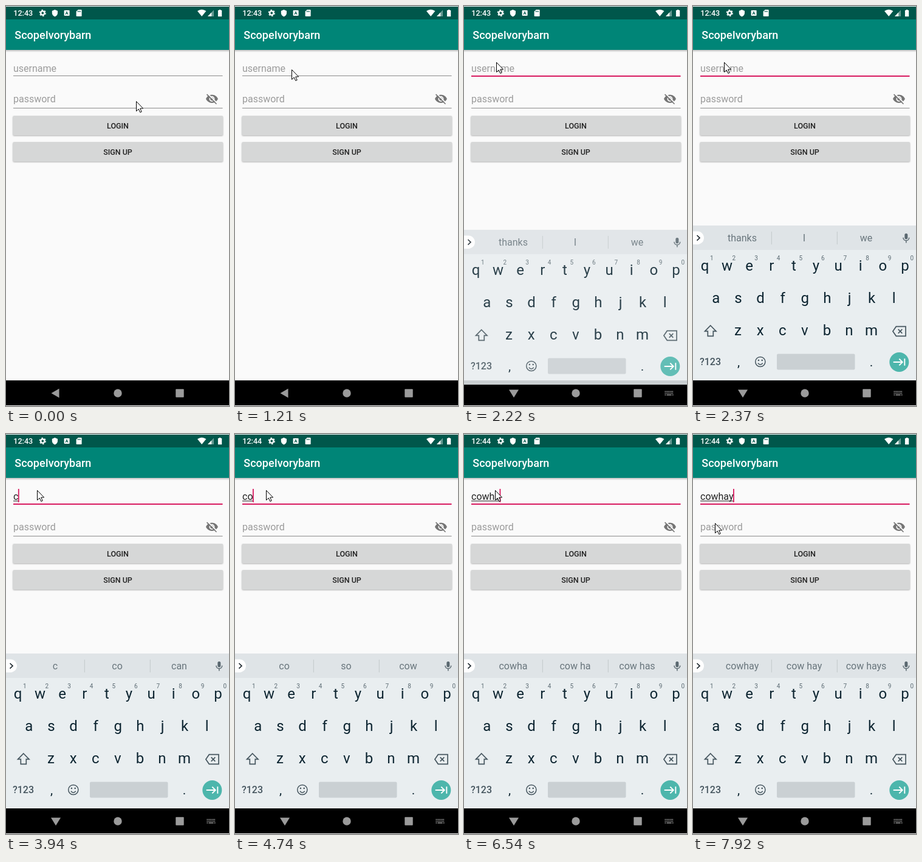
These frames come from a looping animation (367 px wide and 656 px high, 8000 ms). An HTML page:

```html
<!DOCTYPE html>
<html lang="en">
<head>
<meta charset="utf-8">
<title>Sign-in screen</title>
<style>
  html, body { margin: 0; width: 100%; height: 100%; overflow: hidden; background: #fafafa; }
  svg { display: block; font-family: Roboto, sans-serif; }
  .mid { text-anchor: middle; }
  .medium { font-weight: 500; }
  .field { font-size: 16px; fill: #212121; }
  .hint { fill: #9b9b9b; }
  .button { fill: #d6d7d7; filter: drop-shadow(0 1px 1px rgba(0, 0, 0, .3)); }
  .label { font-size: 12.5px; fill: #212121; }
  .key { font-size: 24px; fill: #0d2531; }
  .digit { font-size: 10px; fill: #5c6b73; }
  .word { font-size: 16px; fill: #68757c; }
  .line { fill: none; stroke: #46565f; stroke-width: 1.7; }
</style>
</head>
<body>
<svg width="367" height="656" viewBox="0 0 367 656">
  <defs>
    <linearGradient id="fade" x2="0" y2="1">
      <stop stop-opacity=".24"/>
      <stop offset="1" stop-opacity="0"/>
    </linearGradient>
  </defs>
  <rect width="367" height="656" fill="#fafafa"/>

  <!-- status bar and title -->
  <rect y="1" width="367" height="21" fill="#00574b"/>
  <rect y="22" width="367" height="50" fill="#008577"/>
  <rect y="72" width="367" height="4" fill="url(#fade)"/>
  <g fill="#fff">
    <text id="clock" class="medium" x="12.3" y="16.2" font-size="12.6"></text>
    <text class="medium" x="14.3" y="54" font-size="18">ScopeIvorybarn</text>
    <circle cx="60.3" cy="11.5" r="3.1" fill="none" stroke="#fff" stroke-width="2.4"/>
    <circle cx="60.3" cy="11.5" r="4.9" fill="none" stroke="#fff" stroke-width="1.5" stroke-dasharray="2.6 2.53"/>
    <path d="M80.4 6L85 8V11.5C85 14.4 83 16.6 80.4 17.4C77.8 16.6 75.8 14.4 75.8 11.5V8Z"/>
    <rect x="95.6" y="7" width="9" height="9" rx="1"/>
    <text class="mid" x="100.1" y="14.2" font-size="7.5" font-weight="700" fill="#00574b">A</text>
    <path d="M118.6 6H123.6Q124.6 6 124.6 7V16Q124.6 17 123.6 17H116.6Q115.6 17 115.6 16V9Z"/>
    <path d="M118.4 7.8V10M120.3 7.8V10M122.2 7.8V10" stroke="#00574b"/>
    <path d="M322.2 17L315 8.3Q322.2 3.2 329.4 8.3Z"/>
    <path d="M332 17H342V6.5Z" opacity=".4"/>
    <path d="M332 17H338.2V10.5Z"/>
    <path d="M350.7 6H353.4V7H355.2V17.2H348.9V7H350.7Z"/>
  </g>

  <!-- form -->
  <rect id="rule" x="12" y="114" width="344.5"/>
  <rect x="12" y="167" width="344.5" height="1" fill="#8c8c8c"/>
  <text id="userHint" class="field hint" x="12" y="107.6">username</text>
  <text id="user" class="field" x="12" y="107.6"></text>
  <rect id="under" x="12" y="109.4" height="1" fill="#212121"/>
  <rect id="caret" y="90" width="1.8" height="22" fill="#d81b60"/>
  <text class="field hint" x="12" y="158">password</text>
  <g transform="translate(328.2 141.6) scale(.893)" fill="#757575">
    <path d="M1 12C2.7 7.6 7 4.5 12 4.5S21.3 7.6 23 12C21.3 16.4 17 19.5 12 19.5S2.7 16.4 1 12Z"/>
    <circle cx="12" cy="12" r="5" fill="#fafafa"/>
    <circle cx="12" cy="12" r="3"/>
    <path d="M4 2.2L22 20.2" stroke="#fafafa" stroke-width="2"/>
    <path d="M2.6 3.6L20.4 21.4" stroke="#757575" stroke-width="1.8"/>
  </g>
  <rect class="button" x="11.5" y="180" width="345.5" height="32" rx="1.8"/>
  <rect class="button" x="11.5" y="223" width="345.5" height="32" rx="1.8"/>
  <text class="label medium mid" x="184" y="201">LOGIN</text>
  <text class="label medium mid" x="184" y="244">SIGN UP</text>

  <!-- navigation bar -->
  <rect y="614" width="367" height="41" fill="#000"/>
  <g fill="#9b9b9b">
    <path id="back" d="M74.5 635L87.5 627.5V642.5Z"/>
    <circle cx="184" cy="635" r="6.7"/>
    <rect x="279.3" y="628.3" width="13.4" height="13.4" rx="1"/>
    <g id="switcher" fill="none" stroke="#9b9b9b" stroke-width="1.5">
      <path d="M330.5 632.2H344.5M330.5 635H344.5" stroke-dasharray="1.6 .8"/>
      <path d="M330.5 637.8H332.2M333.5 637.8H341.5M342.8 637.8H344.5"/>
    </g>
  </g>

  <!-- on-screen keyboard -->
  <g id="keyboard">
    <rect y="360" width="367" height="254" fill="#e9eef0"/>
    <rect y="360" width="367" height="40" fill="#dfe4e7"/>
    <rect x="-12" y="369.5" width="30" height="21.5" rx="10.7" fill="#fff"/>
    <path d="M6.5 376L11 380.3L6.5 384.6" class="line" style="stroke:#1f2a30"/>
    <path d="M129.3 370V391M237.3 370V391" stroke="#c2c8cb"/>
    <g id="words"></g>
    <rect x="348.3" y="373" width="5" height="9.5" rx="2.5" fill="#5a6870"/>
    <path d="M345.9 379.7C346 386.3 355.6 386.3 355.7 379.7M350.8 385V388.5" class="line" style="stroke:#5a6870;stroke-width:1.5"/>
    <g id="keys"></g>
    <path d="M28.8 524L38 533.3H33.3V541.3H24.3V533.3H19.6Z" class="line"/>
    <path d="M334.3 525.7H350V541.3H334.3L328.9 533.5Z" class="line"/>
    <path d="M337.7 530.2L344.3 536.8M344.3 530.2L337.7 536.8" class="line"/>
    <text class="medium mid" x="28.5" y="589" font-size="16" fill="#46565f">?123</text>
    <text class="key mid" x="75" y="591" style="font-size:21px">,</text>
    <text class="key mid" x="293.5" y="591" style="font-size:21px">.</text>
    <g class="line" style="stroke-width:1.5">
      <circle cx="110.8" cy="583.5" r="8.1"/>
      <path d="M106.8 585.8Q110.8 590.6 114.8 585.8"/>
    </g>
    <circle cx="107.9" cy="581" r="1.3" fill="#46565f"/>
    <circle cx="113.7" cy="581" r="1.3" fill="#46565f"/>
    <rect x="138" y="570.5" width="128.5" height="26" rx="2" fill="#cad0d3"/>
    <circle cx="339.3" cy="584" r="16" fill="#4db6ac"/>
    <path d="M329.7 584H344.5M339.3 578.6L344.7 584L339.3 589.4M348.3 578.2V589.8" fill="none" stroke="#fff" stroke-width="1.9"/>
  </g>

  <path id="mouse" d="M.5 .5V16.5L4.2 13L6.8 18.5L9.2 17.4L6.7 12H11.6Z" fill="#fff" stroke="#000"/>
</svg>
<script>
const LOOP = 8000;
const $ = id => document.getElementById(id);

function addText(parent, cls, x, y, text = '') {
  const el = document.createElementNS('http://www.w3.org/2000/svg', 'text');
  el.setAttribute('class', cls);
  el.setAttribute('x', x);
  el.setAttribute('y', y);
  el.textContent = text;
  parent.append(el);
  return el;
}

function set(id, attrs) {
  for (const name in attrs) $(id).setAttribute(name, attrs[name]);
}

const show = (id, on) => { $(id).style.display = on ? '' : 'none'; };

const KEY = 36.6;
[['qwertyuiop', 19.5, 434], ['asdfghjkl', 37.9, 487], ['zxcvbnm', 74, 540]].forEach(([row, x, y]) =>
  [...row].forEach((c, i) => addText($('keys'), 'key mid', x + KEY * i, y, c)));
[...'1234567890'].forEach((c, i) => addText($('keys'), 'digit mid', 30.8 + KEY * i, 416.5, c));
const words = [81, 183, 285].map(x => addText($('words'), 'word mid', x, 386.3));

// Each track lists [start time, value]; a value holds until the next one.
const mouse = [
  [0, [214, 156]], [550, [176, 142]], [670, [138, 128]], [790, [112, 119]],
  [940, [103, 111]], [1060, [96, 106]], [1210, [93, 104]], [2070, [66, 96]],
  [2220, [53, 92]], [2370, [51, 92]], [7800, [44, 118]], [7920, [36, 146]]
];
const typed = [[0, ''], [3940, 'c'], [4740, 'co'], [5830, 'cow'], [6110, 'cowh'], [6540, 'cowha'], [6970, 'cowhay']];
const offers = [
  [0, 'thanks,I,we'], [3940, 'c,co,can'], [4740, 'co,so,cow'], [5830, 'cow,Cow,cows'],
  [6230, 'cowh,cow h,cows'], [6540, 'cowha,cow ha,cow has'], [6970, 'cowhay,cow hay,cow hays']
];
const caret = [
  [0, false], [2490, true], [3010, false], [3560, true], [4370, false], [4740, true],
  [5270, false], [5830, true], [7530, false], [7920, true]
];

const at = (track, t) => track.findLast(([start]) => start <= t)[1];

function draw(now) {
  const t = now % LOOP;
  const text = at(typed, t);
  const focused = t >= 1920;
  const open = t >= 2220;
  const settled = t >= 2370;

  set('mouse', { transform: `translate(${at(mouse, t)})` });
  $('clock').textContent = t < 4740 ? '12:43' : '12:44';
  set('rule', { height: focused ? 2 : 1, fill: focused ? '#d81b60' : '#8c8c8c' });

  $('user').textContent = text;
  const width = text ? $('user').getComputedTextLength() : 0;
  show('userHint', !text);
  set('under', { width });
  set('caret', { x: 11.5 + width });
  show('caret', at(caret, t));

  set('back', { d: open ? 'M74 629.3H90L82 642.3Z' : 'M74.5 635L87.5 627.5V642.5Z' });
  show('switcher', open);
  show('keyboard', open);
  set('keyboard', { transform: `translate(0 ${settled ? 0 : 7})`, opacity: settled ? 1 : .87 });
  at(offers, t).split(',').forEach((word, i) => { words[i].textContent = word; });
}

function tick() {
  draw(performance.now());
  requestAnimationFrame(tick);
}
tick();
</script>
</body>
</html>
```
